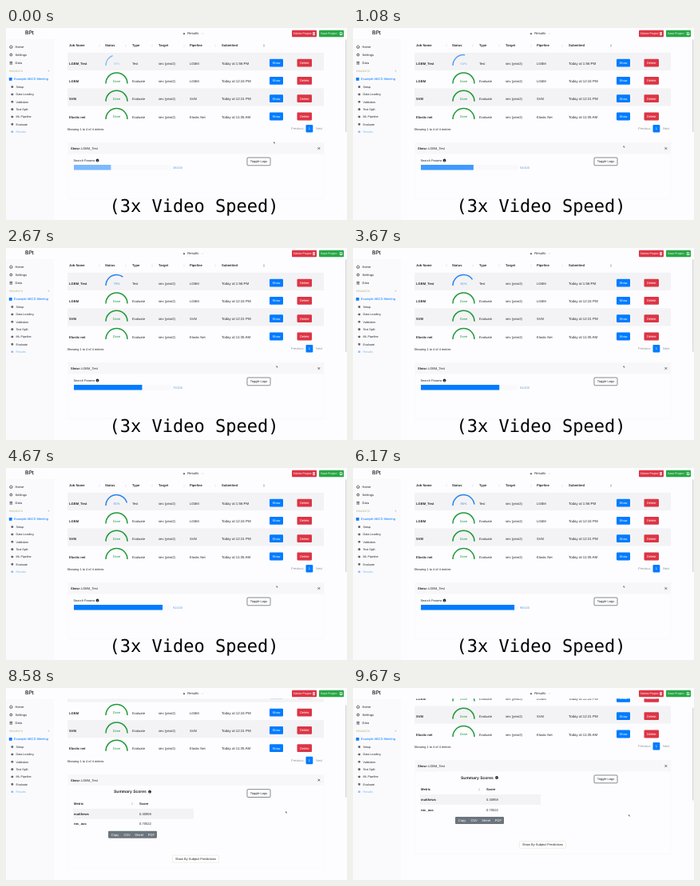
Animation of 427 by 240 pixels, one loop 9760 ms. Source, as an HTML page:

```html
<!DOCTYPE html>
<html lang="en">
<head>
<meta charset="utf-8">
<title>Job results</title>
<style>
  html, body { margin: 0; width: 100%; height: 100%; overflow: hidden; background: #fff; }
  svg { display: block; width: 100vw; height: 100vh; }
  text { font-family: "Liberation Sans", Arial, sans-serif; text-rendering: geometricPrecision; white-space: pre; }
</style>
</head>
<body>
<svg id="stage" viewBox="0 0 427 240"></svg>
<script>
const LOOP = 9760, FINISH = 7000;
const BLUE = '#007bff', RED = '#dc3545', GREEN = '#28a745', DONE = '#219a3a';
const INK = '#24272b', GREY = '#8d949b', STRIPE = '#f3f3f5', PAPER = '#fdfdff';
const stage = document.getElementById('stage');

function add(parent, tag, attrs, content) {
  const node = document.createElementNS('http://www.w3.org/2000/svg', tag);
  for (const key in attrs) node.setAttribute(key, attrs[key]);
  if (content) node.textContent = content;
  return parent.appendChild(node);
}
const group = parent => add(parent, 'g', {});
const rect = (parent, x, y, width, height, fill, more) =>
  add(parent, 'rect', { x, y, width, height, fill, ...more });
const path = (parent, d, stroke, width = 0.6) =>
  add(parent, 'path', { d, stroke, fill: 'none', 'stroke-width': width });

// y is the vertical middle of the line of text
const label = (parent, x, y, content, more = {}) => {
  const size = more['font-size'] || 4.1;
  return add(parent, 'text', { x, y: y + size * 0.35, fill: INK, 'font-size': size, ...more }, content);
};
const BOLD = { 'font-weight': 700 };
const MID = { 'text-anchor': 'middle' };

function button(parent, x, y, w, h, fill, content, more = {}) {
  rect(parent, x, y, w, h, fill, { rx: 1.1, ...more });
  label(parent, x + w / 2, y + h / 2, content,
    { ...MID, fill: more.stroke ? INK : '#fff', 'font-size': 4 });
}
function navButton(x, fill, content, icon) {
  rect(stage, x, 2.8, 31, 8.5, fill, { rx: 1.1 });
  label(stage, x + 2, 7, content, { fill: '#fff', 'font-size': 3.6 });
  const mark = path(stage, icon, '#fff', 0.7);
  mark.setAttribute('transform', `translate(${x + 26} 5.2)`);
}
function info(parent, x, y) {
  add(parent, 'circle', { cx: x, cy: y, r: 1.9, fill: INK });
  label(parent, x, y, 'i', { ...MID, ...BOLD, fill: '#fff', 'font-size': 3 });
}
function gauge(parent, y, color) {
  const arc = path(parent, `M125 ${y}a13.5 13.5 0 0 1 27 0`, color, 1.5);
  arc.setAttribute('pathLength', 100);
  const text = label(parent, 138.5, y - 3, 'Done', { ...MID, fill: color, 'font-size': 4 });
  return { arc, text };
}

rect(stage, 0, 0, 427, 240, PAPER);
const page = group(stage);

// Job table
[['Job Name', 79], ['Status', 124], ['Type', 158], ['Target', 191], ['Pipeline', 230], ['Submitted', 270]]
  .forEach(([title, x]) => label(page, x, 22, title, BOLD));
[117, 150, 183, 223, 262, 323].forEach((x, i) =>
  path(page, `M${x} 20.5v3`, i == 5 ? '#777' : '#ddd', 0.7));

const jobs = [
  ['LGBM_Test', 'Test', 'LGBM', '1:56 PM'],
  ['LGBM', 'Evaluate', 'LGBM', '12:24 PM'],
  ['SVM', 'Evaluate', 'SVM', '12:21 PM'],
  ['Elastic net', 'Evaluate', 'Elastic Net', '11:35 AM']
];
const gauges = jobs.map(([name, type, pipeline, time], i) => {
  const y = 44.3 + 22.3 * i;
  rect(page, 77, y - 13.5, 321, 22.3, i % 2 ? PAPER : STRIPE);
  label(page, 79, y, name, BOLD);
  label(page, 158, y, type);
  label(page, 191, y, 'sex (year2)', { 'font-size': 4.2 });
  label(page, 230, y, pipeline);
  label(page, 270, y, 'Today at ' + time, { 'font-size': 4.4 });
  button(page, 330, y - 5.6, 17, 9.8, BLUE, 'Show');
  button(page, 364.5, y - 5.6, 18.5, 9.8, RED, 'Delete');
  return gauge(page, y + 2.8, DONE);
});

label(page, 76.5, 126.5, 'Showing 1 to 4 of 4 entries', { 'font-size': 3.9 });
label(page, 357, 125.5, 'Previous', { fill: GREY, 'font-size': 4 });
button(page, 375.5, 121, 8.8, 9.5, BLUE, '1');
label(page, 388, 125.5, 'Next', { fill: GREY, 'font-size': 4 });

// Job card
const frame = rect(page, 78, 143.5, 320, 70, PAPER, { stroke: '#f5f5f8', 'stroke-width': 0.5 });
rect(page, 78, 143.5, 320, 14, '#f7f7f9');
label(page, 81, 150.5, 'Show:', { ...BOLD, 'font-size': 4 });
label(page, 94, 150.5, 'LGBM_Test', { 'font-size': 4 });
path(page, 'M390.5 149.2l2.6 2.6m0-2.6l-2.6 2.6', '#333', 0.7);
button(page, 302, 162, 29, 9.8, '#fff', 'Toggle Logs', { stroke: '#343a40', 'stroke-width': 0.6 });

const search = group(page);
label(search, 84.5, 165.5, 'Search Params', { 'font-size': 3.9 });
info(search, 114.5, 165.5);
rect(search, 85, 171, 122, 6.5, '#f9f9fb');
const bar = rect(search, 85, 171, 0, 6.5, BLUE);
const count = label(search, 209, 174.5, '', { fill: '#5b9bdf', 'font-size': 3.9 });

const summary = group(page);
label(summary, 135, 165, 'Summary Scores', { ...BOLD, 'font-size': 5 });
info(summary, 180, 165);
label(summary, 85, 180, 'Metric', BOLD);
label(summary, 167, 180, 'Score', BOLD);
path(summary, 'M158 178.5v3', '#aaa', 0.7);
rect(summary, 84, 186, 151, 13, STRIPE);
[['matthews', '0.30959'], ['roc_auc', '0.70522']].forEach(([metric, score], i) => {
  label(summary, 85, 192.5 + 12.6 * i, metric, BOLD);
  label(summary, 167, 192.5 + 12.6 * i, score);
});
rect(summary, 128, 214, 61, 9, '#6c757d', { rx: 1.1 });
['Copy', 'CSV', 'Sheet', 'PDF'].forEach((name, i) =>
  label(summary, 136.5 + 15.1 * i, 218.5, name, { ...MID, fill: '#fff' }));
button(summary, 208.5, 244.5, 58, 8.8, '#fff', 'Show By Subject Predictions',
  { stroke: '#e2e2da', 'stroke-width': 0.6 });

// Fixed navigation
rect(stage, 0, 0, 60, 240, '#fafafd');
rect(stage, 0, 0, 427, 13.3, PAPER);
label(stage, 24, 5.4, 'BPt', { 'font-size': 6.6, stroke: INK, 'stroke-width': 0.2 });
add(stage, 'path', { d: 'M221.8 8l1.2-2.4 1.2 2.4z', fill: '#444' });
label(stage, 227.3, 7, 'Results', { 'font-size': 4.2 });
path(stage, 'M245 6.5l1 1 1-1', '#bbb', 0.5);
navButton(358, RED, 'Delete Project', 'M0 .3h3M.6 1v2.6h1.8V1M1.5 1v2.4');
navButton(392, GREEN, 'Save Project', 'M.2.2h2.2l.6.6v2.6H.2zM.8 2.4h1.6');

path(stage, 'M4.3 23.6l2-2 2 2M5 23.3v1.8h2.6v-1.8', '#444', 0.8);
add(stage, 'circle', { cx: 6.3, cy: 33.5, r: 1.4, fill: 'none', stroke: '#444', 'stroke-width': 1 });
path(stage, 'M4.5 42.3h3.6m-3.6 1.4h3.6m-3.6 1.4h3.6', '#444', 0.8);
['Home', 'Settings', 'Data'].forEach((name, i) =>
  label(stage, 11.5, 23.3 + 10.1 * i, name, { 'font-size': 4 }));
label(stage, 4, 53.7, 'PROJECTS', { fill: '#a3a46c', 'font-size': 3.2 });
label(stage, 53.5, 53.7, '+', { ...MID, fill: '#888' });
rect(stage, 3.8, 62, 3.8, 3.8, BLUE, { rx: 0.5 });
label(stage, 10, 64, 'Example ABCD Meeting', { fill: BLUE, 'font-size': 4 });
['Setup', 'Data Loading', 'Validation', 'Test Split', 'ML Pipeline', 'Evaluate', 'Results'].forEach((name, i) => {
  const y = 73.6 + 9.35 * i, active = i == 6;
  rect(stage, 6.4, y - 1.3, 2.8, 2.6, active ? '#8fbdf2' : '#666', { rx: 0.8 });
  label(stage, 12.5, y, name, { fill: active ? '#7fb4f0' : INK, 'font-size': 3.7 });
});

const thumb = rect(stage, 425, 14, 1.4, 116, '#d6d6da', { rx: 0.7 });
const pointer = add(stage, 'path', { d: 'M0 0v2.2l.6-.5.8 1 .5-.4-.7-.9h.8z', fill: '#333', stroke: '#fff', 'stroke-width': 0.2 });
const caption = add(stage, 'text', {
  x: 129.5, y: 230, 'font-size': 22, fill: '#000',
  style: 'font-family: "DejaVu Sans Mono", monospace'
}, '(3x Video Speed)');

// Linear interpolation through [time, value] points
function track(points, t) {
  const next = points.findIndex(point => point[0] > t);
  if (next < 0) return points[points.length - 1][1];
  if (next == 0) return points[0][1];
  const [t0, a] = points[next - 1], [t1, b] = points[next];
  return a + (b - a) * (t - t0) / (t1 - t0);
}
const PROGRESS = [[0, 38], [1080, 54], [2670, 70], [4670, 91], [6170, 96], [FINISH, 100]];
const FADE = [[0, 0.5], [1080, 0.75], [2400, 1]];
const SCROLL = [[7700, 0], [8400, 35.3], [8900, 35.3], [9400, 53]];
const POINTER_X = [[0, 335], [600, 338.5], [7000, 338.5], [8200, 350], [8700, 350], [9400, 345]];
const POINTER_Y = [[0, 142], [600, 147], [7000, 147], [8200, 154], [8700, 154], [9400, 158]];
const show = (node, visible) => node.setAttribute('visibility', visible ? 'visible' : 'hidden');

function draw(now) {
  const t = now % LOOP, done = t >= FINISH;
  const progress = track(PROGRESS, t), scroll = track(SCROLL, t), fade = track(FADE, t);
  const { arc, text } = gauges[0];

  bar.setAttribute('width', 1.22 * progress);
  bar.setAttribute('opacity', fade);
  count.textContent = Math.round(progress) + '/100';
  arc.setAttribute('stroke-dasharray', progress + ' 200');
  arc.setAttribute('stroke', done ? DONE : '#2484f0');
  arc.setAttribute('opacity', fade);
  text.textContent = done ? 'Done' : Math.round(progress) + '%';
  text.setAttribute('fill', done ? DONE : '#4a94e8');
  text.setAttribute('opacity', fade);

  show(search, !done);
  show(summary, done);
  show(caption, !done);
  frame.setAttribute('height', done ? 117 : 70);
  page.setAttribute('transform', `translate(0 ${-scroll})`);
  thumb.setAttribute('y', 14 + scroll * 0.2);
  pointer.setAttribute('transform', `translate(${track(POINTER_X, t)} ${track(POINTER_Y, t)})`);
}
const start = performance.now();
function tick() {
  draw(performance.now() - start);
  requestAnimationFrame(tick);
}
tick();
</script>
</body>
</html>
```
